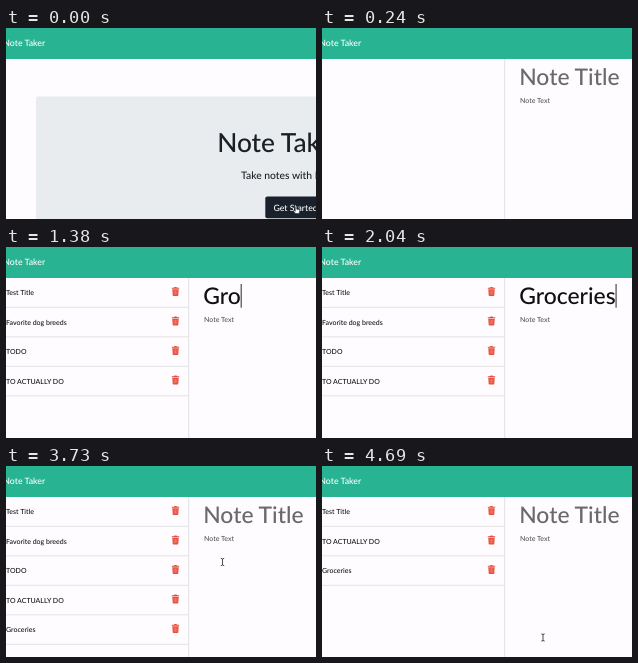
Recreate the animation shown at these times as an HTML page. Size 310 by 191 pixels, loop 4.75 s.

```html
<!DOCTYPE html>
<html lang="en">
<head>
<meta charset="utf-8">
<title>Note Taker</title>
<style>
  html, body { margin: 0; width: 100%; height: 100%; overflow: hidden; background: #fefcff; }
  svg { display: block; width: 310px; height: 191px; font-family: Lato, "Open Sans", sans-serif; font-weight: 500; }
  text { white-space: pre; text-rendering: geometricPrecision; }
  .body { font-size: 7px; fill: #111; }
  .title { font-size: 22.9px; }
</style>
</head>
<body>
<svg viewBox="0 0 310 191" xmlns="http://www.w3.org/2000/svg">
  <defs>
    <g id="trash">
      <path d="M-3.7-3.6h2.2l.5-.8h2l.5.8h2.2v1h-7.4z" fill="#e04b3c"/>
      <path d="M-3.2-2.1h6.4l-.4 6q-.1.7-.8.7h-4q-.7 0-.8-.7z" fill="#e74c3c"/>
      <path d="M-1.4-1v4.5M0-1v4.5M1.4-1v4.5" stroke="#f7b3aa" stroke-width=".4"/>
    </g>
  </defs>
  <rect width="310" height="191" fill="#fefcff"/>
  <g id="landing">
    <rect x="30" y="68.5" width="520" height="190" rx="2" fill="#e8ecef"/>
    <text x="211.2" y="123.7" font-size="26.3" fill="#1b2026">Note Taker</text>
    <text x="235" y="151" font-size="10.35" fill="#1b2026">Take notes with Express</text>
    <rect x="259.3" y="168.5" width="60" height="21.8" rx="2" fill="#1a212c"/>
    <text x="267.4" y="182.6" font-size="8.75" fill="#fff">Get Started</text>
  </g>
  <g id="notes">
    <g id="list"></g>
    <path d="M182.7 31V191" stroke="#d9dadd" stroke-width=".8"/>
    <text id="title" class="title" x="197.2" y="57"></text>
    <g id="text"></g>
    <rect id="caret" width=".9" fill="#111"/>
  </g>
  <rect width="310" height="31" fill="#28b392"/>
  <text x="-2.7" y="17.7" font-size="8.75" fill="#fff">Note Taker</text>
  <g id="cursor">
    <path id="beam" d="M-1.7-3.6Q0-3.6 0-2.5Q0-3.6 1.7-3.6M0-2.8V2.8M-1.7 3.6Q0 3.6 0 2.5Q0 3.6 1.7 3.6" fill="none" stroke="#222" stroke-width=".8"/>
    <path id="hand" d="M-1-3.2q.7-.7 1.2 0v2.4l2.3.5q.8.3.7 1.2l-.6 2.6h-3.6l-2-2.6q0-.8.8-.5l1.2.8z" fill="#fff" stroke="#222" stroke-width=".5"/>
  </g>
</svg>
<script>
const LOOP = 4750;
const TITLE_X = 197.2, TEXT_X = 198, LINE = 10.35, ROW = 29.5;
const BODY = "Milk\nEggs\nBread\nCereal";
const FIRST_ROWS = ["Test Title", "Favorite dog breeds", "TODO", "TO ACTUALLY DO"];

const titleSteps = [[0, ""], [1020, "G"], [1200, "Gr"], [1380, "Gro"], [1680, "Groc"], [1800, "Groce"],
  [1860, "Grocer"], [1920, "Grocerie"], [2040, "Groceries"], [3360, ""]];
const listSteps = [
  [0, []],
  [300, FIRST_ROWS],
  [3360, [...FIRST_ROWS, "Groceries"]],
  [4030, ["Test Title", "TODO", "TO ACTUALLY DO", "Groceries"]],
  [4450, ["Test Title", "TO ACTUALLY DO", "Groceries"]]
];
// Each pointer path is a list of [time, x, y]; it is hidden between paths.
const paths = [
  [[0, 290.5, 182], [239, 290.5, 182]],
  [[300, 288, 150], [540, 264, 57], [780, 234, 51], [1019, 234, 51]],
  [[2760, 222, 156], [2820, 250, 126], [2880, 285, 80], [2939, 285, 80]],
  [[3550, 306, 62], [3730, 216.5, 96], [3850, 171, 78], [4390, 170.5, 77.5], [4690, 221, 171.5], [4750, 221, 171.5]]
];

const el = id => document.getElementById(id);
const show = (node, on) => node.setAttribute("display", on ? "inline" : "none");
const latest = (steps, t) => steps.filter(s => s[0] <= t).pop()[1];

function pointerAt(t) {
  const path = paths.find(p => t >= p[0][0] && t <= p[p.length - 1][0]);
  if (!path) return null;
  const i = Math.max(1, path.findIndex(p => p[0] >= t));
  const [t0, x0, y0] = path[i - 1], [t1, x1, y1] = path[i];
  const k = (t - t0) / (t1 - t0);
  return [x0 + (x1 - x0) * k, y0 + (y1 - y0) * k];
}

function setList(rows) {
  const key = rows.join("|");
  if (el("list").dataset.key === key) return;
  el("list").dataset.key = key;
  el("list").innerHTML = rows.map((name, i) => `<g transform="translate(0 ${i * ROW})">
    <text class="body" x="0" y="48.4">${name}</text>
    <use href="#trash" x="169.5" y="44.3"/>
    <path d="M0 60.3H182.5" stroke="#dcdde0" stroke-width=".8"/></g>`).join("");
}

function setBody(value) {
  const lines = (value || "Note Text").split("\n");
  const style = value ? 'font-weight="600"' : 'style="fill:#555"';
  el("text").innerHTML = lines.map((line, i) =>
    `<text class="body" x="${TEXT_X}" y="${75.3 + i * LINE}" ${style}>${line}</text>`).join("");
  return lines.length - 1;
}

function placeCaret(x, y, height) {
  el("caret").setAttribute("x", x);
  el("caret").setAttribute("y", y);
  el("caret").setAttribute("height", height);
}

function draw(time) {
  const shift = time >= 3610 ? 10 : 0;
  const t = Math.floor((time - shift) / 60) * 60 + shift;
  show(el("landing"), t < 240);
  show(el("notes"), t >= 240);
  setList(latest(listSteps, t));

  const title = latest(titleSteps, t);
  el("title").textContent = title || "Note Title";
  el("title").setAttribute("fill", title ? "#111" : "#6a6a6c");

  const typed = t >= 3360 ? 0 : Math.max(0, Math.min(BODY.length, Math.round((t - 2220) / 480 * BODY.length)));
  const body = BODY.slice(0, typed);
  const row = setBody(body);

  const inTitle = t >= 780 && t < 2220, inBody = t >= 2220 && t < 2880;
  show(el("caret"), inTitle || inBody);
  if (inTitle) placeCaret(TITLE_X + (title ? el("title").getComputedTextLength() : 0), 37, 23.7);
  if (inBody) {
    const last = el("text").lastElementChild;
    const width = body && last.textContent ? last.getComputedTextLength() : 0;
    placeCaret(TEXT_X + width, 68.7 + row * LINE, 8.2);
  }

  const point = pointerAt(t);
  show(el("cursor"), point);
  if (point) {
    const hand = t < 240 || (t >= 3850 && t < 4500);
    el("cursor").setAttribute("transform", `translate(${point})`);
    show(el("hand"), hand);
    show(el("beam"), !hand);
  }
}

const start = performance.now();
function tick() {
  draw((performance.now() - start) % LOOP);
  requestAnimationFrame(tick);
}
tick();
</script>
</body>
</html>
```
